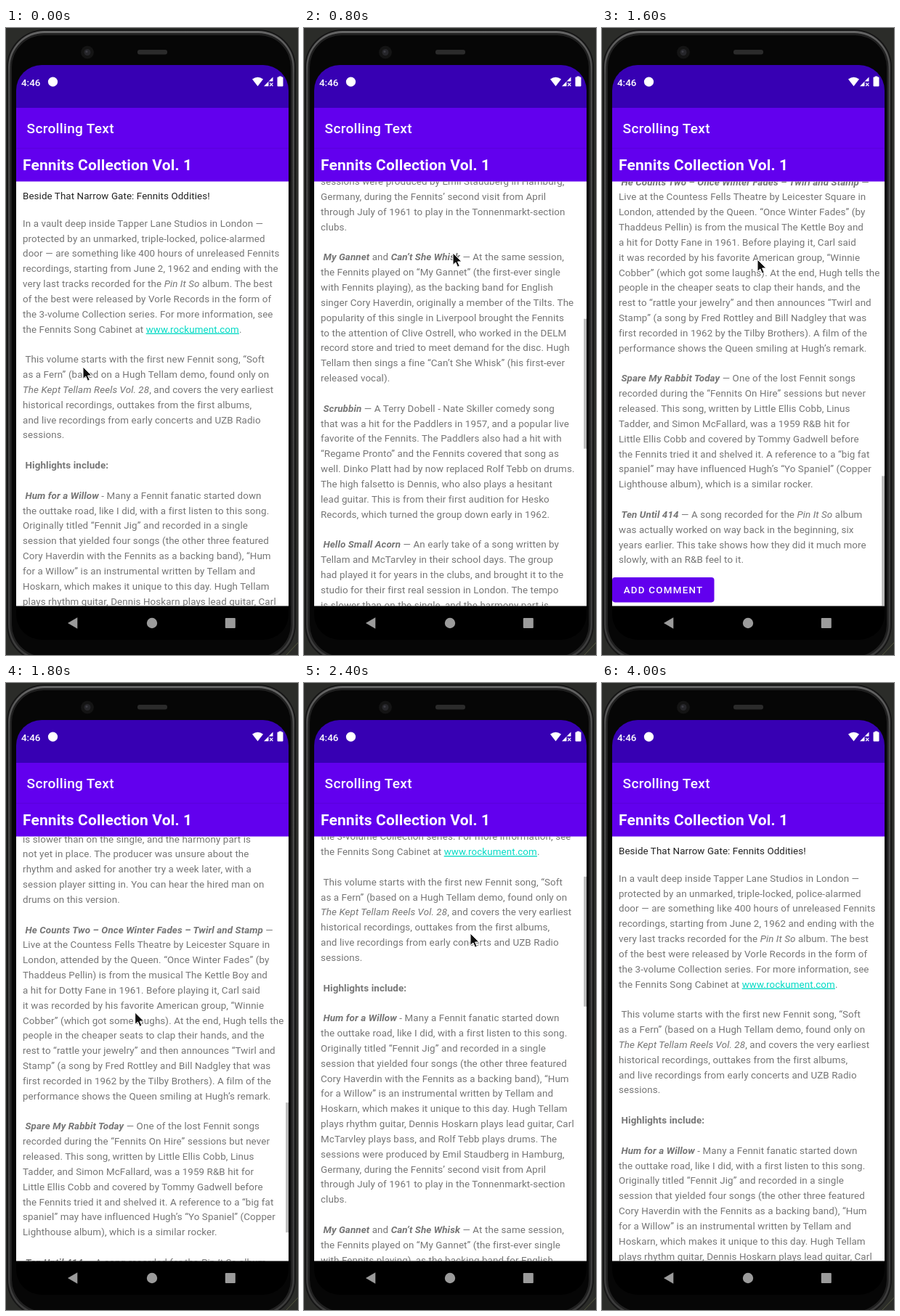
An HTML page that plays this animation: 402x864 px, repeating every 4.1 s.

```html
<!DOCTYPE html>
<html lang="en">
<head>
<meta charset="utf-8">
<title>Scrolling Text</title>
<style>
  html, body { margin: 0; width: 100%; height: 100%; overflow: hidden; background: #2b2c29; }
  svg { display: block; width: 402px; height: 864px; font-family: Roboto, Arial, sans-serif; }
  .body { font-size: 13.37px; letter-spacing: .11px; fill: #757575; }
  .b { font-weight: 700; }
  .i { font-style: italic; }
  .bi { font-weight: 700; font-style: italic; }
  .link { fill: #03dac5; text-decoration: underline; }
</style>
</head>
<body>
<svg viewBox="0 0 402 864" xmlns="http://www.w3.org/2000/svg">
  <defs>
    <linearGradient id="rim" x1="0" y1="0" x2="0" y2="1">
      <stop offset="0" stop-color="#666"/>
      <stop offset=".07" stop-color="#4a4a4a"/>
      <stop offset="1" stop-color="#3c3c3c"/>
    </linearGradient>
    <clipPath id="screen"><rect x="14" y="51" width="375" height="792" rx="35"/></clipPath>
    <clipPath id="view"><rect x="14" y="211.5" width="375" height="585"/></clipPath>
  </defs>

  <rect width="402" height="864" fill="#2b2c29"/>
  <path d="M386 864L402 847" stroke="#55583f" fill="none"/>
  <rect x="1" y="2" width="398" height="872" rx="52" fill="#161616"/>
  <rect x="3" y="4" width="394" height="868" rx="50" fill="url(#rim)"/>
  <rect x="5.5" y="7" width="389" height="862" rx="47" fill="#202020"/>
  <rect x="8" y="10" width="384" height="856" rx="44" fill="#060606"/>
  <circle cx="112" cy="33.5" r="9" fill="#141414"/>
  <circle cx="112" cy="33.5" r="4.5" fill="#26262a"/>
  <circle cx="111" cy="32.5" r="1.5" fill="#3d3d44"/>
  <rect x="181" y="30" width="41" height="6.5" rx="3" fill="#2b2b2b"/>

  <g clip-path="url(#screen)">
    <rect x="14" y="51" width="375" height="59" fill="#3700b3"/>
    <rect x="14" y="110" width="375" height="102" fill="#6200ee"/>
    <rect x="14" y="165" width="375" height="1.5" fill="#000" fill-opacity=".06"/>
    <rect x="14" y="211.5" width="375" height="585.5" fill="#fff"/>
    <g clip-path="url(#view)">
      <g id="content">
        <text x="23" y="235.8" font-size="13.37" letter-spacing=".09" fill="#222">Beside That Narrow Gate: Fennits Oddities!</text>
        <g id="article" class="body"></g>
        <rect x="14" y="2085" width="140.5" height="34.4" rx="3.8" fill="#6200ee"/>
        <text x="29.7" y="2107" font-size="13.37" font-weight="500" letter-spacing="1.25" fill="#fff">ADD COMMENT</text>
      </g>
      <rect id="bar" x="385.2" width="3.8" height="179" fill="#000" fill-opacity=".27"/>
    </g>
    <rect x="14" y="796.5" width="375" height="47" fill="#000"/>
  </g>

  <g fill="#fff">
    <text x="21" y="79.6" font-size="13.4" font-weight="500">4:46</text>
    <circle cx="64.5" cy="74.2" r="6.6"/>
    <path d="M339 70.6Q346.5 65 354 70.6L346.5 80.2Z"/>
    <path d="M367.5 67.6V73.6H361.5V80.2H355Z"/>
    <path d="M363.2 75.6l4.2 4.4m0-4.4l-4.2 4.4" stroke="#fff" stroke-width="1.2"/>
    <path d="M375.7 67.6V66.6h3.6v1h1.2q1 0 1 1V79.4q0 1-1 1h-6q-1 0-1-1V68.6q0-1 1-1Z"/>
    <text x="28.6" y="144.9" font-size="19.1" font-weight="500" letter-spacing=".3">Scrolling Text</text>
    <text x="23" y="196.3" font-size="21" font-weight="700" letter-spacing=".15">Fennits Collection Vol. 1</text>
  </g>

  <g fill="#9b9b9b">
    <path d="M85 820L98.3 812.2V827.8Z"/>
    <circle cx="201" cy="820" r="7.2"/>
    <rect x="301.8" y="813" width="14" height="14" rx="1"/>
  </g>

  <path id="cursor" d="M0 0V16.5L3.8 13L6.5 19.3L9.3 18.1L6.6 12H12Z" fill="#111" stroke="#fff" stroke-width="1"/>
</svg>

<script>
const $ = id => document.getElementById(id);

// *bold italic*, _italic_, ~bold~, [link]
const article = `In a vault deep inside Tapper Lane Studios in London —
protected by an unmarked, triple-locked, police-alarmed
door — are something like 400 hours of unreleased Fennits
recordings, starting from June 2, 1962 and ending with the
very last tracks recorded for the _Pin It So_ album. The best
of the best were released by Vorle Records in the form of
the 3-volume Collection series. For more information, see
the Fennits Song Cabinet at [www.rockument.com].

 This volume starts with the first new Fennit song, “Soft
as a Fern” (based on a Hugh Tellam demo, found only on
_The Kept Tellam Reels Vol. 28_, and covers the very earliest
historical recordings, outtakes from the first albums,
and live recordings from early concerts and UZB Radio
sessions.

 ~Highlights include:~

 *Hum for a Willow* - Many a Fennit fanatic started down
the outtake road, like I did, with a first listen to this song.
Originally titled “Fennit Jig” and recorded in a single
session that yielded four songs (the other three featured
Cory Haverdin with the Fennits as a backing band), “Hum
for a Willow” is an instrumental written by Tellam and
Hoskarn, which makes it unique to this day. Hugh Tellam
plays rhythm guitar, Dennis Hoskarn plays lead guitar, Carl
McTarvley plays bass, and Rolf Tebb plays drums. The
sessions were produced by Emil Staudberg in Hamburg,
Germany, during the Fennits’ second visit from April
through July of 1961 to play in the Tonnenmarkt-section
clubs.

 *My Gannet* and *Can’t She Whisk* — At the same session,
the Fennits played on “My Gannet” (the first-ever single
with Fennits playing), as the backing band for English
singer Cory Haverdin, originally a member of the Tilts. The
popularity of this single in Liverpool brought the Fennits
to the attention of Clive Ostrell, who worked in the DELM
record store and tried to meet demand for the disc. Hugh
Tellam then sings a fine “Can’t She Whisk” (his first-ever
released vocal).

 *Scrubbin* — A Terry Dobell - Nate Skiller comedy song
that was a hit for the Paddlers in 1957, and a popular live
favorite of the Fennits. The Paddlers also had a hit with
“Regame Pronto” and the Fennits covered that song as
well. Dinko Platt had by now replaced Rolf Tebb on drums.
The high falsetto is Dennis, who also plays a hesitant
lead guitar. This is from their first audition for Hesko
Records, which turned the group down early in 1962.

 *Hello Small Acorn* — An early take of a song written by
Tellam and McTarvley in their school days. The group
had played it for years in the clubs, and brought it to the
studio for their first real session in London. The tempo
is slower than on the single, and the harmony part is
not yet in place. The producer was unsure about the
rhythm and asked for another try a week later, with a
session player sitting in. You can hear the hired man on
drums on this version.

 *He Counts Two – Once Winter Fades – Twirl and Stamp* —
Live at the Countess Fells Theatre by Leicester Square in
London, attended by the Queen. “Once Winter Fades” (by
Thaddeus Pellin) is from the musical The Kettle Boy and
a hit for Dotty Fane in 1961. Before playing it, Carl said
it was recorded by his favorite American group, “Winnie
Cobber” (which got some laughs). At the end, Hugh tells the
people in the cheaper seats to clap their hands, and the
rest to “rattle your jewelry” and then announces “Twirl and
Stamp” (a song by Fred Rottley and Bill Nadgley that was
first recorded in 1962 by the Tilby Brothers). A film of the
performance shows the Queen smiling at Hugh’s remark.

 *Spare My Rabbit Today* — One of the lost Fennit songs
recorded during the “Fennits On Hire” sessions but never
released. This song, written by Little Ellis Cobb, Linus
Tadder, and Simon McFallard, was a 1959 R&amp;B hit for
Little Ellis Cobb and covered by Tommy Gadwell before
the Fennits tried it and shelved it. A reference to a “big fat
spaniel” may have influenced Hugh’s “Yo Spaniel” (Copper
Lighthouse album), which is a similar rocker.

 *Ten Until 414* — A song recorded for the _Pin It So_ album
was actually worked on way back in the beginning, six
years earlier. This take shows how they did it much more
slowly, with an R&amp;B feel to it.`;

const PITCH = 20.833, TOP = 211, VIEW = 585.5, TOTAL = 1913.5;
const span = cls => `<tspan class="${cls}">$1</tspan>`;

$('article').innerHTML = article.split('\n').map((line, n) => {
  const marked = line
    .replace(/^ /, '\u00a0')
    .replace(/\*(.+?)\*/g, span('bi'))
    .replace(/_(.+?)_/g, span('i'))
    .replace(/~(.+?)~/g, span('b'))
    .replace(/\[(.+?)\]/g, span('link'));
  return `<text x="23" y="${(273.7 + n * PITCH).toFixed(2)}">${marked}</text>`;
}).join('');

// [time, value...] keys
const scrollKeys = [
  [0, 0], [500, 0], [600, 7], [700, 160], [800, 620], [900, 1050], [1000, 1280],
  [1100, 1320], [1200, 1328], [1600, 1328], [1700, 1310], [1800, 1200],
  [2000, 487], [2100, 390], [2400, 182.5], [3500, 130], [3700, 25], [3800, 0], [4100, 0]
];
const cursorKeys = [
  [0, 106, 467], [300, 165, 640], [500, 185, 560], [600, 182, 489], [700, 190, 350],
  [800, 205, 310], [1000, 219, 584], [1200, 225, 640], [1400, 222, 540], [1600, 214, 319],
  [1700, 205, 310], [2000, 123, 742], [2100, 150, 815], [2400, 229, 345],
  [3500, 270, 500], [3700, 390, 870], [4100, 420, 900]
];

function at(keys, t) {
  const n = Math.max(1, keys.findIndex(k => k[0] >= t));
  const a = keys[n - 1], b = keys[n];
  const u = (t - a[0]) / (b[0] - a[0]);
  return a.slice(1).map((v, i) => v + (b[i + 1] - v) * u);
}

function draw(ms) {
  // The picture advances every 100 ms and rests from 2400 to 3500.
  let t = Math.floor(ms % 4100 / 100) * 100;
  if (t > 2400 && t < 3500) t = 2400;
  const [scroll] = at(scrollKeys, t);
  const [x, y] = at(cursorKeys, t);
  $('content').setAttribute('transform', `translate(0 ${-scroll})`);
  $('bar').setAttribute('y', TOP + scroll * VIEW / TOTAL);
  $('bar').setAttribute('opacity', t >= 600 && t < 3900 ? 1 : 0);
  $('cursor').setAttribute('transform', `translate(${x} ${y})`);
}

const start = performance.now();
function tick() {
  draw(performance.now() - start);
  requestAnimationFrame(tick);
}
tick();
</script>
</body>
</html>
```
